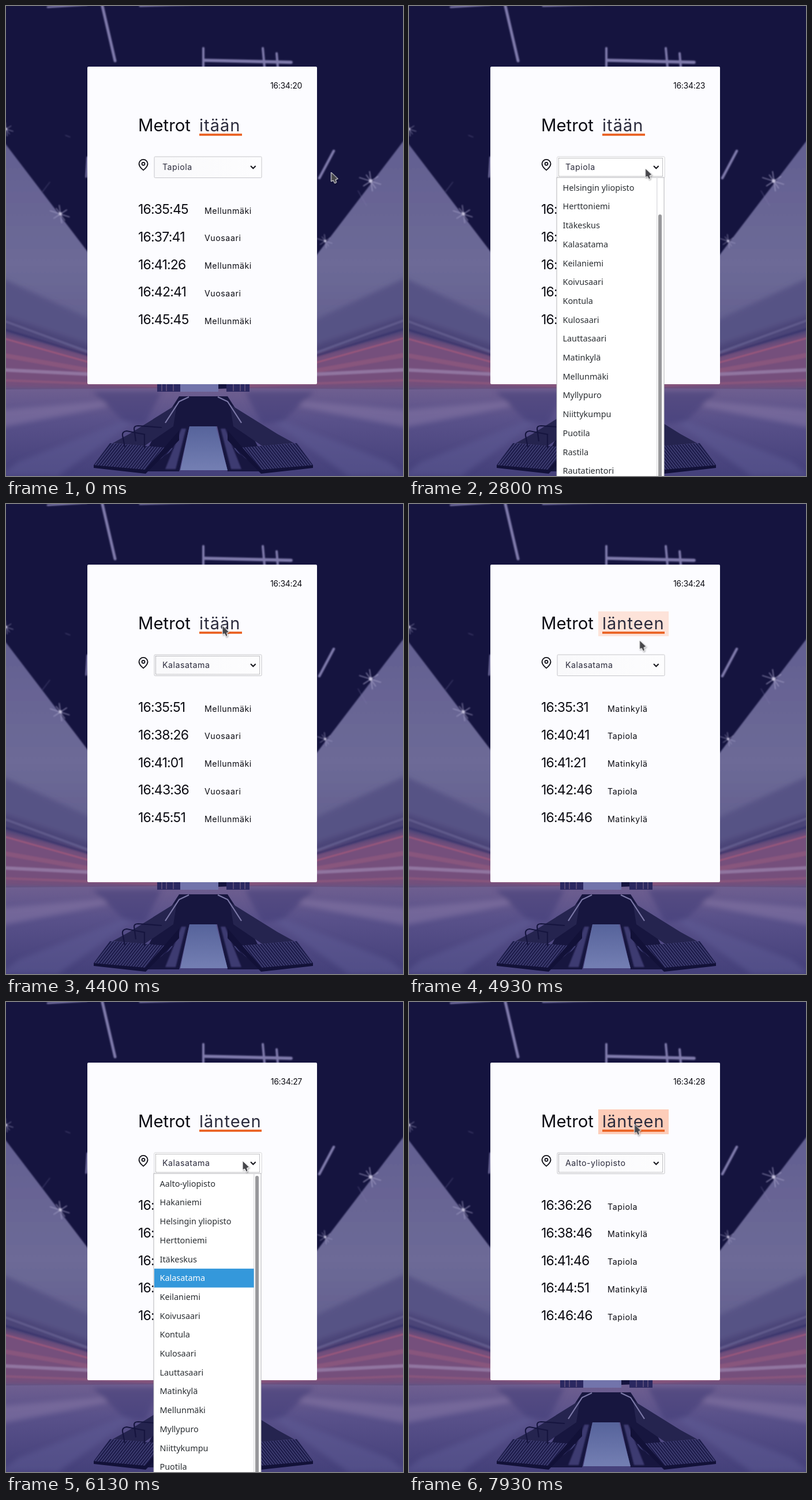
Animation, 688 px wide and 814 px high, one loop 8 s. Source, as an HTML page:

```html
<!DOCTYPE html>
<html lang="fi">
<head>
<meta charset="utf-8">
<title>Metrot</title>
<style>
html, body { margin: 0; width: 100%; height: 100%; overflow: hidden; background: #15143f; }
svg { display: block; width: 100vw; height: 100vh; }
text { font-family: Inter, Lato, sans-serif; fill: #0b0b12; }
.title { font-size: 29.3px; }
.link { font-size: 29px; letter-spacing: 1px; fill: #2b2b3c; }
.time { font-size: 23px; letter-spacing: -.8px; }
.dest { font-size: 14.2px; letter-spacing: .55px; }
.pick { font-size: 14.2px; letter-spacing: .5px; fill: #2b2b3c; }
.clock { font-size: 14px; letter-spacing: -.3px; text-anchor: end; }
.item { font: 14.4px "Noto Sans", "Open Sans", sans-serif; fill: #2a2e32; }
.hot .item { fill: #fff; }

.cursor { animation: move 8s infinite linear; }
@keyframes move {
  0%, 14.1% { transform: translate(563.5px, 288px); }
  21.6% { transform: translate(443px, 280px); animation-timing-function: ease-out; }
  25%, 27.5% { transform: translate(411px, 273px); animation-timing-function: ease-in-out; }
  33%, 35% { transform: translate(409.5px, 281px); animation-timing-function: ease-in; }
  37.1% { transform: translate(405px, 330px); animation-timing-function: ease-out; }
  41.6%, 44.1% { transform: translate(392px, 422px); animation-timing-function: ease-in-out; }
  54.1%, 59.5% { transform: translate(375px, 210.5px); animation-timing-function: ease-in-out; }
  65% { transform: translate(453px, 291px); }
  66.6%, 70% { transform: translate(455px, 293px); animation-timing-function: ease-in-out; }
  74.4%, 78.7% { transform: translate(410px, 275px); animation-timing-function: ease-in-out; }
  87.5%, 90% { transform: translate(365px, 308px); animation-timing-function: ease-in-out; }
  96.2%, 100% { transform: translate(390.5px, 211.5px); }
}
.hover { fill: #fdcdb9; opacity: 0; animation: hover 8s infinite linear; }
@keyframes hover {
  0%, 55.2% { opacity: 0; }
  57.7%, 60.5% { opacity: 1; }
  63%, 94.8% { opacity: 0; }
  97.3%, 100% { opacity: 1; }
}
</style>
</head>
<body>
<svg viewBox="0 0 688 814" preserveAspectRatio="none">
  <defs>
    <linearGradient id="wall" x1="0" y1="0" x2="0" y2="1">
      <stop offset="0" stop-color="#625f91"/>
      <stop offset=".5" stop-color="#6d6a97"/>
      <stop offset="1" stop-color="#5a5788"/>
    </linearGradient>
    <linearGradient id="floor" x1="0" y1="0" x2="0" y2="1">
      <stop offset="0" stop-color="#6f5f90"/>
      <stop offset=".35" stop-color="#59518a"/>
      <stop offset="1" stop-color="#433f79"/>
    </linearGradient>
    <linearGradient id="gap" x1="0" y1="0" x2="0" y2="1">
      <stop offset="0" stop-color="#56639b"/>
      <stop offset="1" stop-color="#747fb3"/>
    </linearGradient>
    <linearGradient id="field" x1="0" y1="0" x2="1" y2="0">
      <stop offset="0" stop-color="#f9f9fb"/>
      <stop offset="1" stop-color="#fdfdfe"/>
    </linearGradient>
    <pattern id="slats" width="5" height="5" patternUnits="userSpaceOnUse" patternTransform="skewX(-38)">
      <rect width="5" height="5" fill="#1d1c4a"/>
      <rect width="1.8" height="5" fill="#45447a"/>
    </pattern>
    <filter id="soft" x="-20%" y="-20%" width="140%" height="140%"><feGaussianBlur stdDeviation="1.1"/></filter>
    <filter id="haze" x="-20%" y="-20%" width="140%" height="140%"><feGaussianBlur stdDeviation="4"/></filter>
    <filter id="shade" x="-50%" y="-50%" width="200%" height="200%"><feDropShadow dx="1" dy="1.5" stdDeviation="1.2" flood-opacity=".35"/></filter>

    <g id="side">
      <path d="M-10 227 141 425 300 640V665H-10Z" fill="url(#wall)" filter="url(#soft)"/>
      <g filter="url(#haze)">
        <path d="M-10 470 141 540 280 640 141 585-10 545Z" fill="#565285"/>
        <path d="M-10 535 141 585 270 645V662L-10 590Z" fill="#4b4478"/>
        <path d="M-10 568 141 604 270 651V665L-10 662Z" fill="#75507c"/>
      </g>
      <g fill="none" filter="url(#soft)" opacity=".55">
        <path d="M-10 543 200 620" stroke="#6f6a9a" stroke-width="4"/>
        <path d="M-10 558 200 622" stroke="#332e68" stroke-width="4"/>
        <path d="M-10 574 230 641" stroke="#c2607a" stroke-width="2.5"/>
        <path d="M-10 604 262 652" stroke="#995b7e" stroke-width="8"/>
        <path d="M-10 630 150 638" stroke="#a794bd" stroke-width="6"/>
        <path d="M-10 648 262 658" stroke="#9a5c7d" stroke-width="4"/>
      </g>
      <path d="M-10 664 290 662 343 664V820H-10Z" fill="url(#floor)"/>
      <g filter="url(#haze)" opacity=".5">
        <path d="M-10 700 262 676 120 705-10 730Z" fill="#8a7aa8"/>
        <path d="M20 790 250 700 90 814-10 814Z" fill="#5f5b95"/>
        <path d="M150 668H270L240 725 205 720Z" fill="#403a76"/>
      </g>
      <path d="M262 655H302V668H285L262 668Z" fill="#2b2860"/>
      <path d="M270 655V667M278 655V667M290 655V667" stroke="#66567f" stroke-width="1.5"/>
      <path d="M300 676H343V728H318L300 806H225L262 735Z" fill="#17163f"/>
      <path d="M304 732 312 732 294 802 276 802Z" fill="#3d3a71" filter="url(#soft)"/>
      <path d="M214 741 296 690 290 728 240 762 185 757Z" fill="#25244f"/>
      <path d="M180 757 293 766 241 804 152 795Z" fill="url(#slats)"/>
      <path d="M152 795 241 803 300 735V752L242 810 152 800Z" fill="#121138"/>
      <path d="M317 677 300 685 276 722" fill="none" stroke="#7c79a8" stroke-width="2.2"/>
    </g>
    <g id="spark" stroke="#a9a4cb" stroke-width="1.2">
      <path d="M-20-6 18 6M-13 9 13-8M-2-17 3 18M9 13-8-11"/>
      <circle r="3.2" fill="#c3bfdb" stroke="none"/>
    </g>
  </defs>

  <rect width="688" height="814" fill="#15143f"/>
  <use href="#side"/>
  <use href="#side" transform="translate(684 0) scale(-1 1)"/>
  <path d="M302 655H368V668H302Z" fill="#7274ab"/>
  <path d="M318 728H364L384 804H302Z" fill="url(#gap)"/>
  <g fill="none" stroke="#16153f" stroke-width="2.2">
    <path d="M206 764 202 744Q201 737 209 736L240 742V765M225 754 222 732Q222 727 229 727L270 730"/>
  </g>
  <g fill="none" stroke="#7f7aab" stroke-linecap="round" filter="url(#soft)">
    <path d="M166-4 189 95" stroke-width="5"/>
    <path d="M72 2 140-2M232 0 340-3" stroke-width="3"/>
    <path d="M342 73V106M445 73 448 106M469 82 471 106" stroke-width="4"/>
    <path d="M344 94 494 97.5" stroke-width="5.5"/>
    <path d="M568 251 543 298" stroke-width="4.5"/>
    <path d="M141 262 139 296" stroke-width="3"/>
    <path d="M63 322 76 305M610 320 625 346M103 224 111 227" stroke-width="1" opacity=".6"/>
  </g>
  <g filter="url(#soft)">
    <use href="#spark" x="632" y="303"/>
    <use href="#spark" transform="translate(553 407) scale(.7)"/>
    <use href="#spark" transform="translate(94 360) scale(.9)"/>
    <use href="#spark" transform="translate(0 213) scale(.7)"/>
  </g>

  <rect x="141" y="105" width="398" height="550" rx="2" fill="#fcfcff"/>
  <text class="title" x="229" y="217">Metrot</text>
  <g id="page"></g>

  <g fill="none" stroke="#111118" stroke-width="2.2" transform="translate(228 265) scale(.835)">
    <path d="M21 10c0 7-9 13-9 13s-9-6-9-13a9 9 0 0 1 18 0z"/>
    <circle cx="12" cy="10" r="3"/>
  </g>
  <rect x="257" y="261" width="186" height="36.5" rx="1.5" fill="url(#field)" stroke="#c6c6ca"/>
  <g id="select"></g>
  <path d="M424 277 428.3 281.3 432.6 277" fill="none" stroke="#18181f" stroke-width="2.1"/>
  <g id="lists"></g>

  <g class="cursor">
    <path d="M0 0V16L3.6 14 6.3 19.2 9 17.6 7.6 12.6 11.8 11.2Z" fill="#47474c" stroke="#fff" stroke-width="1" filter="url(#shade)"/>
  </g>
</svg>
<script>
const LOOP = 8000, ROW = 32.7, TOP = 298.3;
const $ = id => document.getElementById(id);
const style = document.head.appendChild(document.createElement('style'));
let count = 0;

function add(parent, name, attrs = {}, text = '') {
  const el = document.createElementNS('http://www.w3.org/2000/svg', name);
  for (const key in attrs) el.setAttribute(key, attrs[key]);
  el.textContent = text;
  return parent.appendChild(el);
}
const label = (parent, cls, x, y, text) => add(parent, 'text', { class: cls, x, y }, text);

// A group that is shown only from one time to another.
function during(parent, from, to) {
  const name = 'show' + count++;
  const pct = ms => ms / LOOP * 100 + '%';
  style.append(`@keyframes ${name}{0%{opacity:0}${pct(from)}{opacity:1}${pct(to)}{opacity:0}}
.${name}{opacity:0;animation:${name} 8s infinite step-end}`);
  return add(parent, 'g', { class: name });
}

const ticks = [0, 730, 1700, 2700, 4400, 5000, 5700, 6100, 6800, LOOP];
ticks.slice(0, -1).forEach((from, i) =>
  label(during($('page'), from, ticks[i + 1]), 'clock', 513, 142.5, '16:34:' + (20 + i)));

function heading(from, to, text, width) {
  const g = during($('page'), from, to);
  add(g, 'rect', { class: 'hover', x: 328, y: 186, width: width + 14, height: 43 });
  add(g, 'rect', { x: 335, y: 221, width, height: 3.8, fill: '#ea6426' });
  label(g, 'link', 335, 217, text);
}
heading(0, 4700, 'itään', 74);
heading(4700, LOOP, 'länteen', 108);

function board(from, to, times, ends) {
  const g = during($('page'), from, to);
  times.split(' ').forEach((time, i) => {
    const y = 360 + 47.8 * i;
    label(g, 'time', 229, y, '16:' + time);
    label(g, 'dest', 344, y - .5, ends[i % 2]);
  });
}
const east = ['Mellunmäki', 'Vuosaari'], west = ['Matinkylä', 'Tapiola'];
board(0, 3530, '35:45 37:41 41:26 42:41 45:45', east);
board(3530, 4700, '35:51 38:26 41:01 43:36 45:51', east);
board(4700, 7200, '35:31 40:41 41:21 42:46 45:46', west);
board(7200, LOOP, '36:26 38:46 41:46 44:51 46:46', [...west].reverse());

function focus(from, to) {
  add(during($('select'), from, to), 'rect', {
    x: 259.5, y: 263.5, width: 180, height: 31.5, fill: 'none', stroke: '#85858a', 'stroke-dasharray': '1 1'
  });
}
function opened(from, to) {
  add(during($('select'), from, to), 'rect', { x: 257.5, y: 261.5, width: 185, height: 36, fill: '#fff' });
}
opened(2200, 3530);
opened(6050, 7200);
focus(2200, 4700);
focus(6050, LOOP);
label(during($('select'), 0, 3530), 'pick', 271, 284, 'Tapiola');
label(during($('select'), 3530, 7200), 'pick', 271, 284, 'Kalasatama');
label(during($('select'), 7200, LOOP), 'pick', 271, 284, 'Aalto-yliopisto');

const stations = ['Aalto-yliopisto', 'Hakaniemi', 'Helsingin yliopisto', 'Herttoniemi', 'Itäkeskus',
  'Kalasatama', 'Keilaniemi', 'Koivusaari', 'Kontula', 'Kulosaari', 'Lauttasaari', 'Matinkylä',
  'Mellunmäki', 'Myllypuro', 'Niittykumpu', 'Puotila', 'Rastila', 'Rautatientori'];

// marks: [row on screen, from, to]
function list(from, to, skip, marks) {
  const g = during($('lists'), from, to);
  add(g, 'rect', { x: 256, y: 297, width: 186, height: 560, fill: '#fff', stroke: '#b4b4b8' });
  add(g, 'path', { d: 'M429.8 298V814', stroke: '#cfcfd3' });
  add(g, 'rect', { x: 432, y: 301 + 30 * skip, width: 6, height: 545, rx: 3, fill: '#98989b' });
  const shown = stations.slice(skip);
  const item = (parent, row) => label(parent, 'item', 266.5, TOP + 21.4 + ROW * row, shown[row]);
  shown.forEach((_, row) => item(g, row));
  for (const [row, a, b] of marks) {
    const hot = during(g, a, b);
    hot.classList.add('hot');
    add(hot, 'rect', { x: 257, y: TOP + ROW * row, width: 172.5, height: ROW, fill: '#3498db' });
    item(hot, row);
  }
}
list(2200, 3530, 2, [[1, 2970, 3130], [2, 3130, 3250], [3, 3250, 3530]]);
list(6050, 7200, 0, [[5, 6050, 6700], [0, 6700, 7200]]);
</script>
</body>
</html>
```
